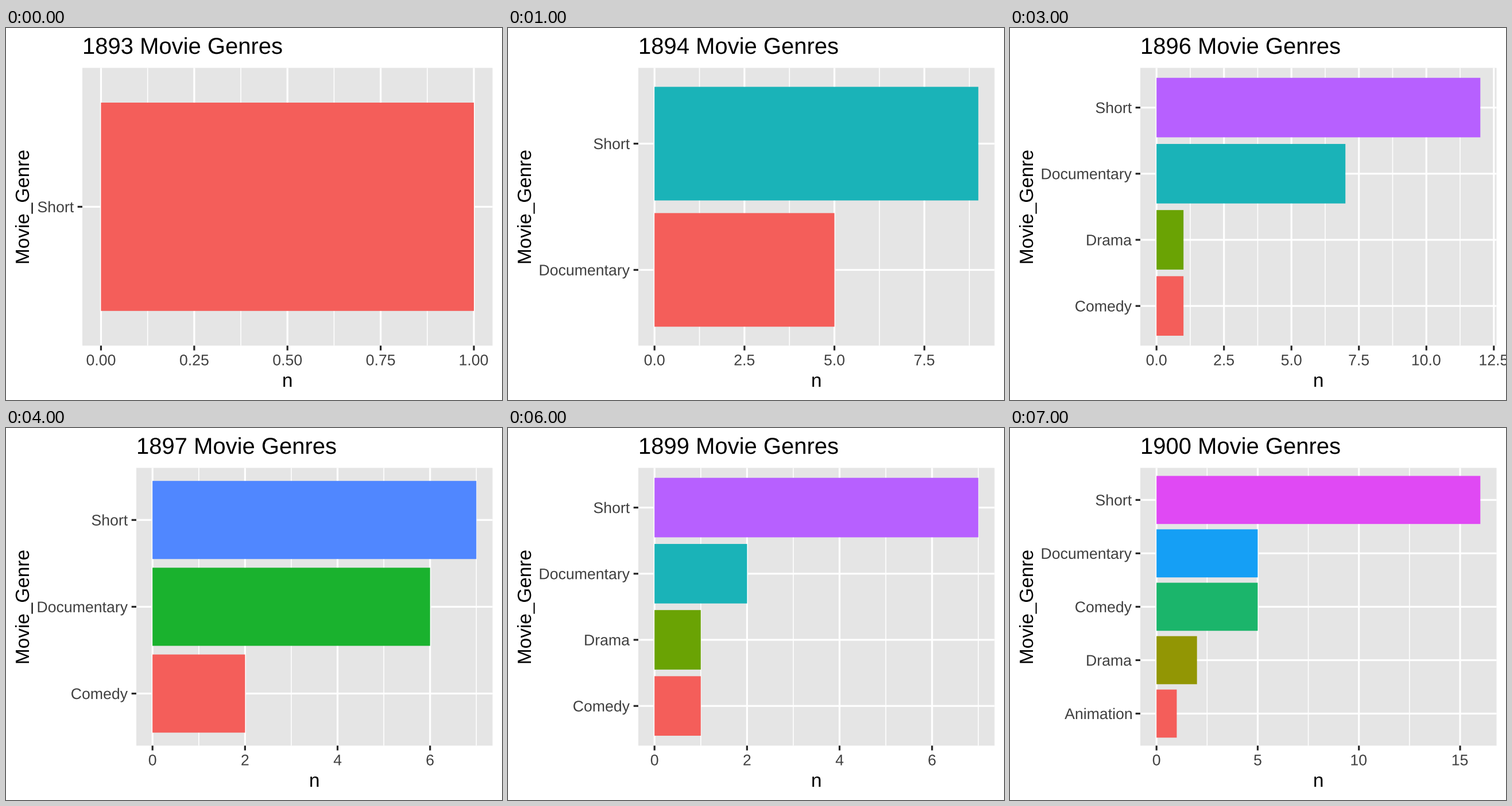
A matplotlib script for the animation above (8000 ms loop, 864 by 648 pixels).

```python
import numpy as np
import matplotlib.pyplot as plt
from matplotlib.animation import FuncAnimation
from matplotlib.patches import PathPatch, Rectangle
from matplotlib.textpath import TextPath
from matplotlib.transforms import Affine2D

W, H, DPI = 864, 648, 100
TOP, BOTTOM, RIGHT = 69.5, 553.3, 847.5
BASE = 100 / 3            # base font size in pixels
THICK = 3.2               # major grid and tick width
TICK = 8.3                # tick length

PANEL, INK, TICK_INK, LABEL_INK = "#e5e5e5", "#000000", "#262626", "#404040"
RED = "#f45e5a"
PALETTES = {              # bars from bottom to top
    1: [RED],
    2: [RED, "#1ab3b8"],
    3: [RED, "#1ab22e", "#5087ff"],
    4: [RED, "#6aa304", "#1ab3b8", "#b760ff"],
    5: [RED, "#929604", "#1bb56b", "#159ff5", "#e049f4"],
}

# year, tick step, tick decimals, panel left edge, bars from bottom to top
CHARTS = [
    (1893, 0.25, 2, 133, [("Short", 1)]),
    (1894, 2.5, 1, 227, [("Documentary", 5), ("Short", 9)]),
    (1895, 2, 0, 227, [("Documentary", 5), ("Short", 8)]),
    (1896, 2.5, 1, 227, [("Comedy", 1), ("Drama", 1),
                         ("Documentary", 7), ("Short", 12)]),
    (1897, 2, 0, 227, [("Comedy", 2), ("Documentary", 6), ("Short", 7)]),
    (1898, 1, 0, 227, [("Documentary", 1), ("Drama", 1),
                       ("Comedy", 2), ("Short", 5)]),
    (1899, 2, 0, 227, [("Comedy", 1), ("Drama", 1),
                       ("Documentary", 2), ("Short", 7)]),
    (1900, 5, 0, 227, [("Animation", 1), ("Drama", 2), ("Comedy", 5),
                       ("Documentary", 5), ("Short", 16)]),
]

fig = plt.figure(figsize=(W / DPI, H / DPI), dpi=DPI, facecolor="white")
ax = fig.add_axes([0, 0, 1, 1])
ax.set_xlim(0, W)
ax.set_ylim(H, 0)
ax.axis("off")


def box(x0, y0, x1, y1, color):
    ax.add_patch(Rectangle((x0, y0), x1 - x0, y1 - y0, facecolor=color,
                           linewidth=0, snap=False))


def vline(x, y0, y1, width, color):
    box(x - width / 2, y0, x + width / 2, y1, color)


def hline(y, x0, x1, width, color):
    box(x0, y - width / 2, x1, y + width / 2, color)


def text(s, x, y, size, color, align="center", upright=False):
    """Draw s with its baseline through (x, y)."""
    path = TextPath((0, 0), s, size=size, prop={"family": "Liberation Sans"})
    ink = path.get_extents()
    shift = {"left": 0, "center": -(ink.x0 + ink.x1) / 2, "right": -ink.x1}
    place = Affine2D().translate(shift[align], 0).scale(1, -1)
    if upright:
        place.rotate_deg(-90)
    place.translate(x, y)
    ax.add_patch(PathPatch(path.transformed(place), facecolor=color,
                           linewidth=0, snap=False))


def draw(i):
    for patch in list(ax.patches):
        patch.remove()
    year, step, decimals, left, bars = CHARTS[i]
    count = len(bars)
    peak = max(n for _, n in bars)
    unit = (BOTTOM - TOP) / (count + 0.2)

    def px(v):
        return left + (RIGHT - left) * (v / peak + 0.05) / 1.1

    def py(k):
        return BOTTOM - (k + 0.6) * unit

    box(left, TOP, RIGHT, BOTTOM, PANEL)
    limit = peak * 1.05
    majors = np.arange(0, limit, step)
    for v in np.arange(step / 2, limit, step):
        vline(px(v), TOP, BOTTOM, THICK / 2, "white")
    for k in range(count):
        hline(py(k), left, RIGHT, THICK, "white")
    for v in majors:
        vline(px(v), TOP, BOTTOM, THICK, "white")

    for k, ((name, n), color) in enumerate(zip(bars, PALETTES[count])):
        y = py(k)
        box(px(0), y - 0.45 * unit, px(n), y + 0.45 * unit, color)
        hline(y, left - TICK, left, THICK, TICK_INK)
        text(name, left - 15, y + 9.5, 0.8 * BASE, LABEL_INK, "right")

    for v in majors:
        vline(px(v), BOTTOM, BOTTOM + TICK, THICK, TICK_INK)
        text(f"{v:.{decimals}f}", px(v), 587.5, 0.8 * BASE, LABEL_INK)

    text(f"{year} Movie Genres", left, 45, 1.2 * BASE, INK, "left")
    text("n", (left + RIGHT) / 2, 625, BASE, INK)
    text("Movie_Genre", 40, (TOP + BOTTOM) / 2, BASE, INK, upright=True)
    return ax.patches


anim = FuncAnimation(fig, draw, frames=len(CHARTS), init_func=lambda: [],
                     interval=1000, repeat=True, repeat_delay=0)
plt.show()
```
